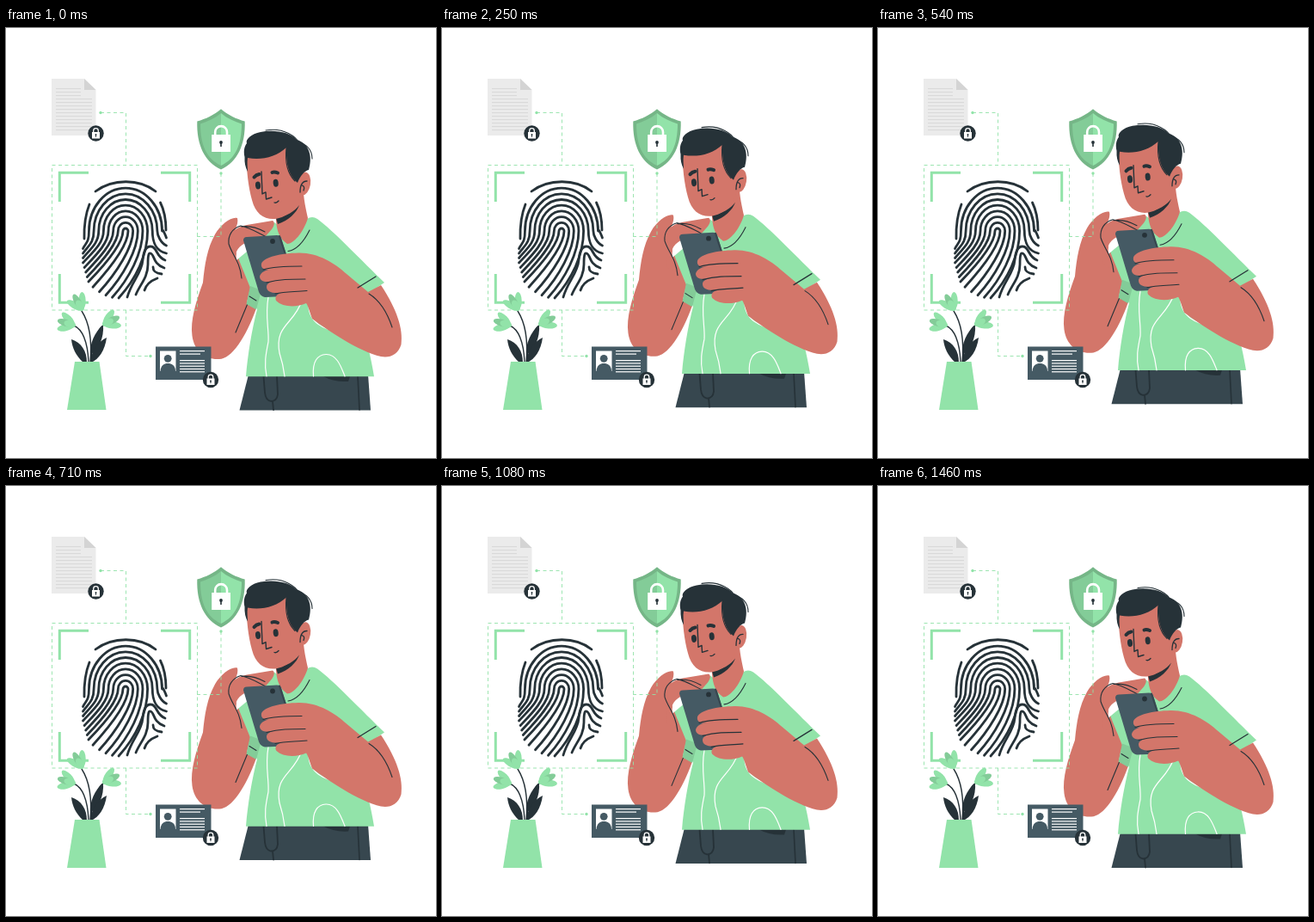
Write an HTML page with a canvas that moves like this. It is 500 px wide and 500 px high and loops after 1.5 s.

```html
<!DOCTYPE html>
<html lang="en">
<head>
<meta charset="utf-8">
<title>Fingerprint access</title>
<style>
html, body { margin: 0; width: 100%; height: 100%; overflow: hidden; background: #fff; }
canvas { display: block; width: 500px; height: 500px; }
</style>
</head>
<body>
<canvas id="stage" width="500" height="500"></canvas>
<script>
const ctx = document.getElementById('stage').getContext('2d');
const LOOP = 1500, RISE = 10;
const INK = '#263238', SLATE = '#37474f', STEEL = '#455a64', WHITE = '#fff';
const GREEN = '#92e3a9', MID = '#83cc98', DEEP = '#75b687', SKIN = '#d3766a';

ctx.lineCap = 'round';
ctx.lineJoin = 'round';

function fill(d, color) {
  ctx.fillStyle = color;
  ctx.fill(new Path2D(d));
}
function line(d, color = INK, width = 1.1) {
  ctx.strokeStyle = color;
  ctx.lineWidth = width;
  ctx.stroke(new Path2D(d));
}
function oval(x, y, rx, ry, color, turn = 0) {
  ctx.fillStyle = color;
  ctx.beginPath();
  ctx.ellipse(x, y, rx, ry, turn, 0, Math.PI * 2);
  ctx.fill();
}
const dot = (x, y, r, color) => oval(x, y, r, r, color);
function box(x, y, w, h, color) {
  ctx.fillStyle = color;
  ctx.fillRect(x, y, w, h);
}

function badge(x, y) {
  dot(x, y, 9.2, INK);
  box(x - 4.5, y - 1.5, 9, 7.5, WHITE);
  line(`M${x - 2.8},${y - 1} v-2 a2.8,2.8 0 0 1 5.6,0 v2`, WHITE, 1.3);
  dot(x, y + 1.5, 1, INK);
  box(x - 0.5, y + 1.5, 1, 2.7, INK);
}

function sheet() {
  fill('M53,59H91L104.5,72V125H53Z', '#ebebeb');
  fill('M91,59V72H104.5Z', '#d4d4d4');
  for (let i = 0; i < 13; i++) {
    box(58, 70 + i * 4, i < 3 ? 29 : 42, 1.1, '#d9d9d9');
  }
  badge(104.5, 122.5);
}

function card() {
  box(174, 370.5, 64.5, 38.5, STEEL);
  box(179, 375.5, 18.5, 23.5, WHITE);
  dot(188.2, 384.3, 4.4, STEEL);
  fill('M179.5,399C180,392 184,390 188.2,390S197,392 197,399Z', STEEL);
  box(202, 375, 29, 1.2, WHITE);
  box(202, 378.5, 24, 1.2, WHITE);
  for (let i = 0; i < 5; i++) box(202, 386 + i * 3.3, 29, 1.2, WHITE);
  badge(238, 409);
}

function shield() {
  fill('M250,94.3C242,101 232,106 222.3,108.5C221.5,136 231,156 250,164.5C269,156 278.5,136 277.7,108.5C268,106 258,101 250,94.3Z', DEEP);
  fill('M250,99C243,105 234,109 226,111.5C226,136 233,152 250,160Z', MID);
  fill('M250,99C257,105 266,109 274,111.5C274,136 267,152 250,160Z', GREEN);
  box(239.2, 124, 21.8, 20, WHITE);
  line('M243.2,124V121a6.9,6.9 0 0 1 13.8,0V124', WHITE, 2.6);
  dot(250, 133, 1.9, INK);
  box(249.2, 133, 1.6, 5, INK);
}

function connectors() {
  ctx.lineCap = 'butt';
  ctx.setLineDash([4, 3.5]);
  line('M53.5,159.5H222.5V328H53.5Z', GREEN, 0.9);
  line('M110,98.5H139.5V159', GREEN, 0.9);
  line('M139.5,328V381.5H168', GREEN, 0.9);
  line('M250,169V242.5H222', GREEN, 0.9);
  ctx.setLineDash([]);
  ctx.lineCap = 'round';
  dot(110, 98.5, 1.7, GREEN);
  dot(168, 381.5, 1.7, GREEN);
  dot(250, 169, 1.7, GREEN);
}

function scanFrame() {
  ctx.lineCap = 'butt';
  ctx.lineJoin = 'miter';
  line('M62.3,202V168.3H96M180,168.3H213.7V202M62.3,286V319.3H96M180,319.3H213.7V286', GREEN, 3);
  ctx.lineCap = ctx.lineJoin = 'round';
}

// Nested arches: left legs sweep to the left edge, right legs curl under the core.
function fingerprint() {
  const cx = 139, cy = 236, width = 2.8;
  for (let i = 0; i < 8; i++) {
    const rx = 3 + 5.65 * i, ry = 3 + 6.7 * i;
    const left = cx - rx, right = cx + rx;
    const endX = 89.5 + Math.max(0, 4 - i) * 1.6, endY = 295 - 5.5 * i;
    let d = `M${endX},${endY}C${(endX + left) / 2},${endY - (endY - cy) * 0.35} ${left},${cy + 14} ${left},${cy}`;
    d += `A${rx},${ry} 0 0 1 ${right},${cy}`;
    if (i < 5) {
      const baseX = 101 + 7.5 * i, baseY = 314 - 0.8 * (4 - i) ** 2;
      d += `C${right},${cy + 16 + i * 3} ${baseX + 20},${baseY - 22} ${baseX},${baseY}`;
    } else {
      const flareY = 262 - 9 * (i - 5);
      d += `C${right},${flareY - 12} ${right + 4},${flareY - 3} 186.5,${flareY}`;
    }
    line(d, INK, width);
  }
  line('M104,190C124,175 155,175 174,190', INK, width);
  line('M91,245C90.5,226 93,215 97,205M186,235C186,222 184,212 179.5,203', INK, width);
  line('M141,313C146,295 158,285 159,270C160,258 164,254 168,254C176,254 174,266 185,270', INK, width);
  line('M151,310C156,298 165,290 165,275C165,264 166,261 168,262C173,263 170,274 184,279', INK, width);
  line('M161,305C163,298 168,294 176,291M171,278C171,283 174,285 181,286', INK, width);
}

function flower(x, y, angle) {
  ctx.save();
  ctx.translate(x, y);
  ctx.rotate(angle);
  for (const turn of [-0.5, 0.5, 0]) {
    ctx.save();
    ctx.rotate(turn);
    oval(11, 0, 10, 4, turn ? GREEN : MID);
    ctx.restore();
  }
  oval(6, 0, 7, 4.2, GREEN);
  ctx.restore();
}

function plant() {
  line('M98,388C100,365 97,343 88,329M96,388C95,368 90,351 79,346M99,388C100,365 106,350 114,345', INK, 1.4);
  fill('M76,362C88,366 94,376 94,389H90C81,381 77,372 76,362Z', INK);
  fill('M113,345C114,361 108,373 98,380C97,367 103,354 113,345Z', INK);
  fill('M117,360C115,375 108,385 99,389C98,377 106,365 117,360Z', INK);
  flower(89, 328, -2.1);
  flower(80, 346, -2.85);
  flower(113, 345, -0.45);
  fill('M80,388H108.5L116.5,444H71Z', GREEN);
}

function trousers() {
  fill('M282,403H421L424,444.5H271.5Z', SLATE);
  line('M299.5,405L301,424Q302,433 308,434Q315,434 316,426L315,405M310,434L311,444', INK, 1.8);
  line('M409,405L411,444', INK, 1.6);
  fill('M369,405H400L398,411Q381,412 369,405Z', INK);
}

function shirt() {
  fill('M312,226C296,240 283,253 266,271L283,310L292,327C286,350 281,380 279,405.3H428C424,380 418,360 415,345L422,308L440,296C415,272 380,235 362,222Q356,218 350,222L330,240Z', GREEN);
  line('M305,313C301,335 306,350 305,365C302,380 300,390 303,405', WHITE, 1.2);
  line('M344,317C335,345 312,345 318,378C322,390 323,397 324,405', WHITE, 1.2);
  line('M352,320C351,343 370,351 392,355C412,360 422,372 426,384', WHITE, 1.2);
  line('M357.5,405C356,388 362,380 372,379.5C385,379 390,395 394,405', WHITE, 1.2);
}

function head() {
  fill('M313,205L345,180C346,200 349,212 351,221C346,238 334,251 327,251C318,245 315,236 314,224Z', SKIN);
  fill('M314,221C326,219 336,213 341,206C338,215 328,224 316,228Z', INK);
  line('M353,235C346,249 338,258 328,259.5');
  oval(346.5, 181, 7.5, 13.5, SKIN, 0.16);
  fill('M280,144C279,165 282,185 286,200C290,216 300,223 313,222C328,220 339,209 343,192L345,138H310Z', SKIN);
  fill('M277.5,150C276,143 277,138 280,134C278,130 285,123 296,121C312,118 330,121 338,130C352,134 357,148 352,165C347,166 342,172 339,180C330,173 325,160 326,139C314,150 297,154 281,151C280,157 281,162 281,167Q277,160 277.5,150Z', INK);
  line('M302,119C324,115 338,128 340,133C350,135 356,142 356,152');
  line('M326,139C324,158 328,170 336,178');
  line('M288.5,173.5Q291,170.5 294.5,170M309.5,168Q312,166.8 316,168.5', INK, 4);
  oval(293, 183, 3, 4.5, INK, -0.1);
  oval(313.7, 180.3, 3, 4.5, INK, -0.1);
  line('M297,167L298,193L302,191L302.5,199L309,197', INK, 1.4);
  line('M312,203Q314.5,204 317,201', INK, 1.3);
  line('M342,191C342,182 345,178 350,178M344,183Q348,184 346,189', INK, 1.3);
}

function leftArm() {
  fill('M269,221C262,219 250,228 243,240C234,256 231,275 229,296C221,318 214,340 216.5,358C219,376 232,386 248,385C262,385 279,360 291,326L280,320L284,302L273,275L262,247C264,238 271,229 269,221Z', SKIN);
  fill('M279,249C270,255 266,262 268,270L280,260Z', WHITE);
  fill('M259,252C258,239 266,232 280,229L310,224C313,226 312,230 309,234L301,243L278,250C268,256 265,262 269,272L277,291L262,282Z', SKIN);
  line('M301,242C291,237 283,232 273,230C263,233 258,241 259,251C263,264 272,271 274,291M274,231Q286,229 301,237');
  line('M267,354L282,318');
  fill('M284,300L279.5,321L291,327.5L297,305Z', MID);
  line('M283,312L291,317');
}

function phone() {
  fill('M280,243L315,241Q319,241 320,244L334,288L324,312L301,313Q296,312 294,307L276,247Q276,243 280,243Z', STEEL);
  line('M318,242L332,286', SLATE, 2);
  dot(310, 248, 2.9, INK);
}

function rightArm() {
  fill('M436,299C455,328 462,350 459.5,368C456,380 446,384 436,382C410,376 375,352 356,338C353,330 351,322 349,320C338,325 322,325 314,317C312,312 316,309 320,308C308,309 303,306 303,301C303,297 308,295 312,294C301,297 295,294 295,289C296,284 302,281 308,281C300,282 296,279 297,274C300,266 320,262 340,261.5C362,261 382,273 396,286L421,307Z', SKIN);
  line('M299,281C312,277 330,277 344,277M303,296C318,292 330,292 348,292M313,309C325,306 335,307 350,305.5');
  line('M422,309C435,317 443,330 449,348');
  line('M409,302L430,289', INK, 1.3);
}

function draw(now) {
  const phase = (now % LOOP) / LOOP;
  const lift = RISE * (1 - Math.abs(1 - 2 * phase));
  box(0, 0, 500, 500, WHITE);
  sheet();
  scanFrame();
  fingerprint();
  plant();
  shield();
  ctx.save();
  ctx.translate(0, -lift);
  [trousers, shirt, head, leftArm, phone, rightArm].forEach(part => part());
  ctx.restore();
  connectors();
  card();
}

const start = performance.now();
function tick() {
  draw(performance.now() - start);
  requestAnimationFrame(tick);
}
tick();
</script>
</body>
</html>
```
